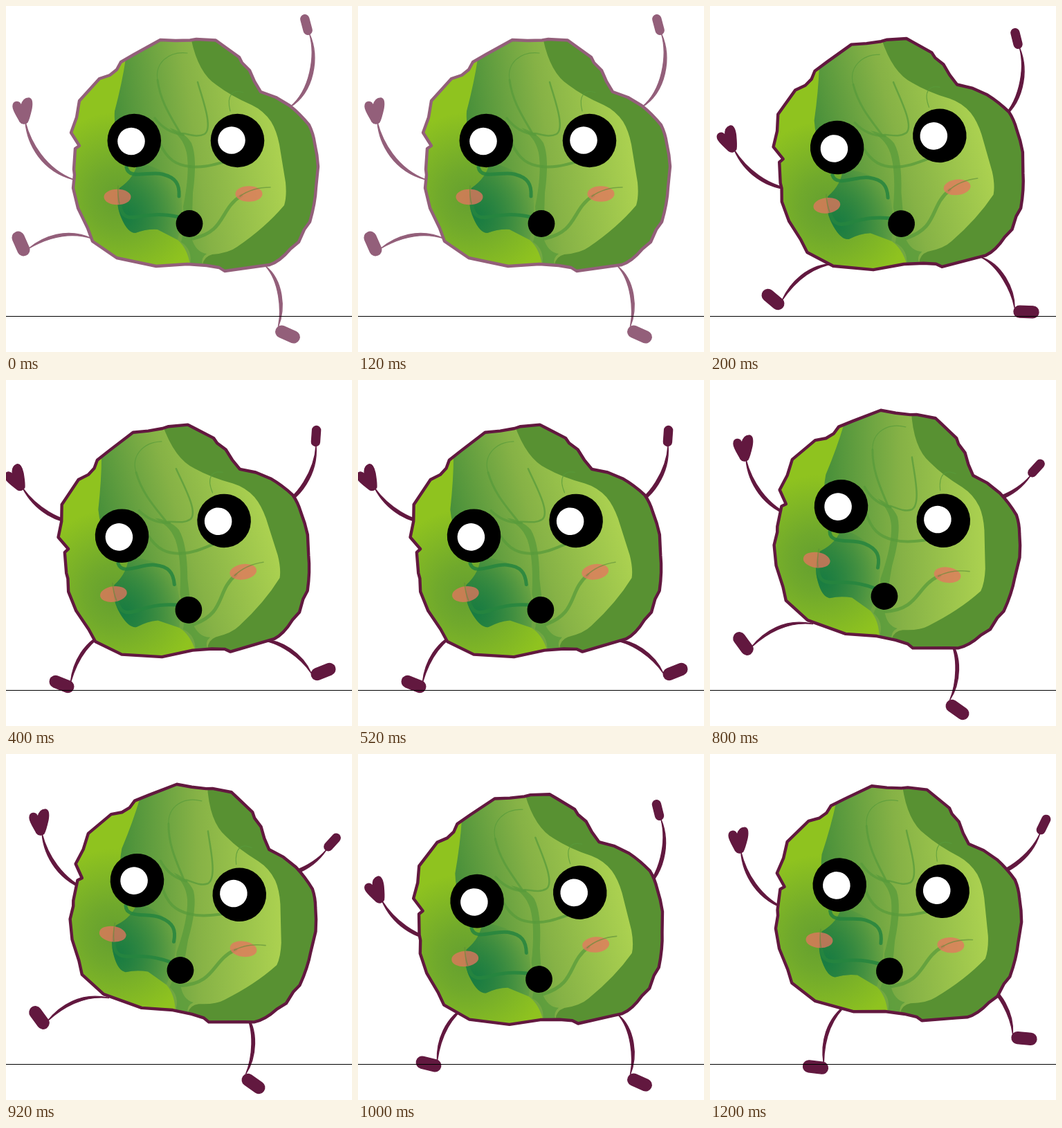
Animation, 500 px wide and 500 px high, one loop 1.4 s. Source, as an HTML page:

```html
<!DOCTYPE html>
<html lang="en">
<head>
<meta charset="utf-8">
<title>Dancing cabbage</title>
<style>
  html, body { margin: 0; width: 100%; height: 100%; overflow: hidden; background: #fff; }
  svg { display: block; width: 100%; height: 100%; }
  .limb { fill: currentColor; stroke: currentColor; stroke-width: 1.4; stroke-linejoin: round; }
  .vein { fill: none; stroke-linecap: round; }
</style>
</head>
<body>
<svg id="stage" viewBox="0 0 500 500">
  <defs>
    <path id="shape" d="M223,49 L245,50 L266,49.5 L275,48 L303,49.5 L312,56 L337,74 L341,82 L352,93 L359,109 L368,124
      L390,132 L410,144 Q425,156 438,172 Q444,184 446,198 Q450,215 451,232 L448,262 Q447,285 439,312 L431,323 L423,341
      L411,351 Q396,369 381,374 L366,376 L316,383 L308,378 L290,375 L262,373 L217,376 L160,364 L125,340 L118,321
      L104,292 L97,263 L99,244 L98,236 L100,206 L106,202 L94,183 L102,161 L106,137 L135,105 L150,100 L160,92
      L166,81 L185,70 Z"/>
    <clipPath id="inside"><use href="#shape"/></clipPath>
    <radialGradient id="leaf" gradientUnits="userSpaceOnUse" cx="163" cy="278" r="125">
      <stop offset="0" stop-color="#649f30"/><stop offset=".35" stop-color="#70a92c"/><stop offset="1" stop-color="#8fc31f"/>
    </radialGradient>
    <linearGradient id="heart" gradientUnits="userSpaceOnUse" x1="160" y1="235" x2="394" y2="200">
      <stop offset="0" stop-color="#438d39"/><stop offset=".5" stop-color="#86b246"/><stop offset="1" stop-color="#abd150"/>
    </linearGradient>
    <radialGradient id="shade" gradientUnits="userSpaceOnUse" cx="172" cy="305" r="95">
      <stop offset="0" stop-color="#187c42"/><stop offset="1" stop-color="#187c42" stop-opacity="0"/>
    </radialGradient>
  </defs>

  <g id="limbs"></g>

  <g id="body">
    <g clip-path="url(#inside)">
      <rect x="80" y="30" width="390" height="370" fill="#589132"/>
      <path fill="url(#leaf)" d="M80,30 H200 L240,300 L286,400 H80 Z"/>
      <g id="core">
        <path id="corePath" fill="url(#heart)" d="M175,40 L173,76 Q168,110 157,152 Q154,200 190,226 Q186,248 164,263
          Q157,285 167,307 Q176,328 187,328 Q203,322 219,323 L248,338 Q262,350 266,374 L284,374 Q286,362 298,359
          Q322,357 334,348 Q375,320 402,288 Q406,275 404,255 L395,200 Q391,180 383,167 Q372,151 355,143
          Q325,130 304,114 Q276,96 266,40 Z"/>
        <path fill="url(#shade)" d="M190,226 Q186,248 164,263 Q157,285 167,307 Q176,328 187,328 Q203,322 219,323
          L248,338 Q258,300 252,262 Q235,236 190,226 Z"/>
      </g>
      <g class="vein" stroke="#589b3b" stroke-opacity=".75">
        <path fill="#589b3b" fill-opacity=".75" stroke="none" d="M266,374 Q270,352 253,341 Q260,320 256,290
          Q266,240 261,212 C257,194 248,186 236,176 Q258,182 268,198 Q277,220 270,270 L268,335 Q274,356 290,358
          Q281,364 284,374 Z"/>
        <path stroke-width="1.2" d="M262,68 C235,65 215,82 219,107"/>
        <path stroke-width="3" d="M219,107 C223,138 238,160 252,184"/>
        <path stroke-width="2.5" d="M277,110 C283,132 300,176 287,185 C275,191 262,184 254,184"/>
        <path stroke-width="3.5" d="M215,162 C226,177 241,184 256,186"/>
        <path stroke-width="4" d="M222,198 C233,222 246,230 266,232"/>
        <path stroke-width="4" d="M266,232 C290,235 310,225 332,222"/>
        <path stroke-width="1.2" d="M324,152 C318,128 328,120 343,125"/>
        <path stroke-width="5" d="M270,336 C318,326 308,294 340,274"/>
      </g>
      <g class="vein" stroke="#26853f" stroke-opacity=".85">
        <path stroke-width="5" d="M174,233 C177,252 208,238 226,243 C246,248 251,258 250,275"/>
        <path stroke-width="5" d="M164,282 C166,318 190,302 212,302 C230,300 244,304 256,306"/>
      </g>
    </g>
    <use id="rim" href="#shape" fill="none" stroke="currentColor" stroke-width="4.4" stroke-linejoin="round"/>
    <g fill="#e7745f" fill-opacity=".75">
      <ellipse cx="161" cy="276" rx="19.5" ry="11.2"/>
      <ellipse cx="351" cy="271.5" rx="19.5" ry="11.2"/>
    </g>
    <g class="vein" stroke="#5b8c3a" stroke-opacity=".6" stroke-width="1.6">
      <path d="M162,260 Q161,274 164,286"/>
      <path d="M338,275 Q356,262 382,262"/>
    </g>
    <circle cx="185.3" cy="194.5" r="38.8"/>
    <circle cx="334.5" cy="194.5" r="38.8"/>
    <g fill="#fff">
      <circle cx="181" cy="195.5" r="19.8"/>
      <circle cx="326" cy="194" r="19.8"/>
    </g>
    <circle cx="265" cy="314.5" r="19.4"/>
  </g>
  <path d="M0,448.5 H500" stroke="#000"/>
</svg>
<script>
  const STEP = 200, STEPS = 7;
  const $ = id => document.getElementById(id);

  // Each pose is x, y, angle; the body turns about the point between its eyes.
  const bodyPoses = [
    [259.5, 194.3, 0], [257.3, 195.8, -6.6], [240.9, 214.2, -8.4], [259.5, 194.3, 0],
    [263, 192.7, 7.9], [246, 206.2, -4.8], [261.3, 193.5, 3.5]
  ];

  const capsule = (w, h) =>
    `<rect x="${-w / 2}" y="${-h / 2}" width="${w}" height="${h}" rx="${Math.min(w, h) / 2}"/>`;
  const mitten = `<path d="M-2,-7 C0,-16 5,-18 9,-18 C15,-17 14,-9 13,-3 C11,6 9,13 7,17
    C4,20 -1,20 -4,16 C-7,10 -14,0 -14,-6 C-14,-13 -5,-16 -2,-7 Z"/>`;

  // Limbs are rigid: an end piece at the origin and a tapered curve that runs behind the body.
  const limbs = [
    { end: mitten, curve: [4, 17, 9, 47, 30, 86, 74, 100], swell: [-2.2, 2],
      poses: [[24, 151, 0], [26, 193, -18], [14, 142, -22], [47, 114, 0], [48, 98, 0], [25.5, 197, -18], [41, 124, 1]] },
    { end: capsule(12, 29), curve: [1, 14, 4, 48, -16, 95, -54, 109], swell: [2.5, 2],
      poses: [[434, 27, -15], [443, 47, -14], [448, 81, 4], [442, 91, 9], [471.5, 127.5, 42], [433.5, 81, -14], [482, 102, 26]] },
    { end: capsule(36, 17), curve: [11, -7, 6, -32, 7, -70, 36, -98], swell: [-2.5, -1],
      poses: [[21.5, 343.5, 66], [91, 424, 40], [80.5, 439.5, 22], [88, 415, 42], [48, 381, 54], [102, 448, 14], [152.5, 452.5, 7]] },
    { end: capsule(36, 17), curve: [-17, -5, -20, -31, -40, -67, -69, -77], swell: [2.2, -2],
      poses: [[407, 474.5, 24], [457, 442, 2], [458.5, 421.5, -22], [467, 384, -12], [357.5, 476.5, 35], [407, 474.5, 24], [454, 411, 5]] }
  ];

  function taper([ax, ay, bx, by, cx, cy, dx, dy], [sx, sy]) {
    return `M${ax},${ay} C${bx + sx},${by + sy} ${cx + sx},${cy + sy} ${dx},${dy}` +
      ` C${cx - sx},${cy - sy} ${bx - sx},${by - sy} ${ax},${ay} Z`;
  }

  $('limbs').innerHTML = limbs.map(l =>
    `<g class="limb">${l.end}<path d="${taper(l.curve, l.swell)}"/></g>`).join('');
  const limbNodes = [...$('limbs').children];

  const place = (node, [x, y, angle], after = '') =>
    node.setAttribute('transform', `translate(${x} ${y}) rotate(${angle})${after}`);

  function draw(now) {
    const i = Math.floor(now / STEP) % STEPS;
    $('stage').style.color = i ? '#62183f' : '#935f7a';
    place($('body'), bodyPoses[i], ' translate(-259.5 -194.3)');
    limbs.forEach((l, k) => place(limbNodes[k], l.poses[i]));
  }

  let start;
  function tick(now) {
    start ??= now;
    draw(now - start);
    requestAnimationFrame(tick);
  }
  draw(0);
  requestAnimationFrame(tick);
</script>
</body>
</html>
```
